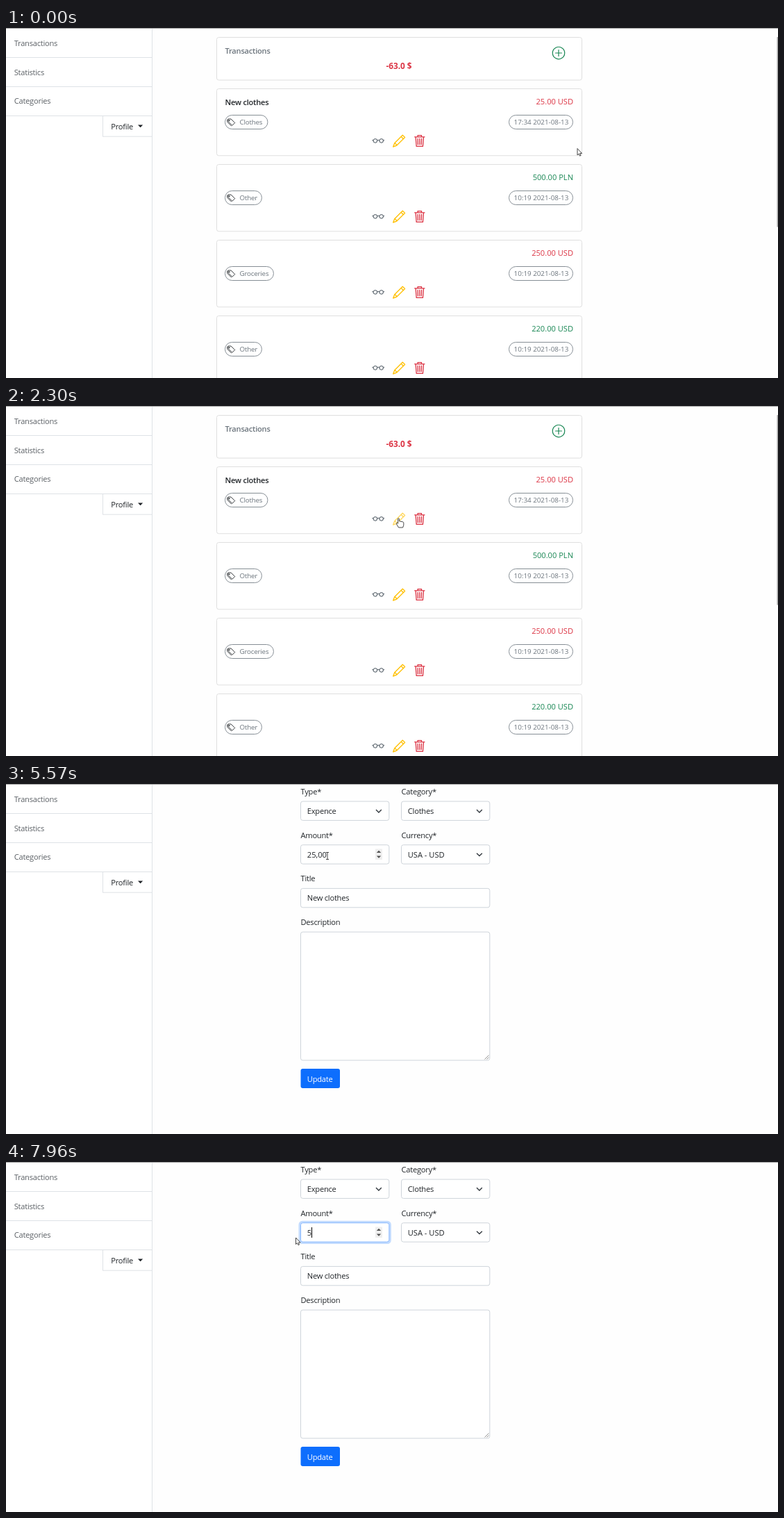
Recreate the animation shown at these times as an HTML page. Size 1112 by 504 pixels, loop 8000 ms.

```html
<!DOCTYPE html>
<html lang="en">
<head>
<meta charset="utf-8">
<title>Transactions</title>
<style>
html, body { margin: 0; width: 100%; height: 100%; overflow: hidden; background: #fefefe; }
svg { display: block; width: 100vw; height: 100vh; }
text { font: 11.1px "Open Sans", "Noto Sans", sans-serif; letter-spacing: -.02em; fill: #212529; white-space: pre; }
.gray { fill: #6c757d; }
.nav { fill: #5c6166; }
.red { fill: #dc3545; }
.green { fill: #198754; }
.white { fill: #fff; }
.semi { font-weight: 600; }
.num { letter-spacing: 0; }
.small { font-size: 9.8px; }
.end { text-anchor: end; }
.total { font-size: 11.8px; font-weight: 700; text-anchor: middle; letter-spacing: 0; }
.icon { fill: none; stroke-width: 1.2; stroke-linecap: round; stroke-linejoin: round; }
</style>
</head>
<body>
<svg id="stage" viewBox="0 0 1112 504"></svg>
<script>
const LOOP = 8000;
const FRAME = 54;
const BORDER = '#ced4da', CARD = '#dfdfdf', LINE = '#dee2e6', PILL = '#868e95';
const $ = id => document.getElementById(id);

const text = (x, y, s, cls = '') => `<text x="${x}" y="${y}" class="${cls}">${s}</text>`;
const rect = (x, y, w, h, r, stroke, fill = '#fff', extra = '') =>
  `<rect x="${x}" y="${y}" width="${w}" height="${h}" rx="${r}" stroke="${stroke}" fill="${fill}" ${extra}/>`;
const line = (d, stroke, w = 1) => `<path d="${d}" fill="none" stroke="${stroke}" stroke-width="${w}"/>`;
const icon = (id, x, y, scale, color, d) =>
  `<path id="${id}" class="icon" transform="translate(${x} ${y}) scale(${scale})" stroke="${color}" d="${d}"/>`;

const TAG = 'M2.5 1.5h5l7.4 7.4-5 5-7.4-7.2zM.5 2.8v4.5l7.5 7.5M4 4h1v1h-1z';
const GLASSES = 'M1.5 8a2.5 2.5 0 1 1 0 .1M9.5 8a2.5 2.5 0 1 1 0 .1M6.5 7.6q1.5-1 3 0M.4 7.4h1M14.5 7.4h1';
const PENCIL = 'M12.5.6l2.9 2.9L5.2 13.6.6 15.4l1.8-4.6zM10.6 2.5l2.9 2.9M2.6 10.6l2.8 2.8';
const TRASH = 'M1.5 3h13M5.5 3v-2h5v2M2.8 3l1 12.3h8.4l1-12.3M5.5 5.4l.3 7.6M8 5.4v7.6M10.5 5.4l-.3 7.6';

// Sidebar
const navItem = (label, i) => {
  const y = 41.8 * i;
  return text(11.7, y + 25.8, label, 'nav') + line(`M0 ${Math.round(y + 42) + .5}h210`, LINE);
};
const sidebar = rect(-1, -1, 211.5, 506, 0, LINE) +
  ['Transactions', 'Statistics', 'Categories'].map(navItem).join('') +
  rect(139.5, 126.5, 71, 29.7, 0, LINE) +
  text(151.3, 146, 'Profile') +
  '<path d="M190 139.5h7.2l-3.6 3.8z" fill="#212529"/>' +
  line('M0 .5h1112', '#a3a3a3');

// Transaction list
const pill = (x, y, w) => rect(x, y, w, 20, 10, PILL);
const card = ([title, amount, color, tag, time], i) => {
  const y = 87.5 + 109 * i;
  return rect(303.5, y, 526, 96.3, 3, CARD) +
    text(315.5, y + 23.2, title, 'semi') +
    text(817, y + 22, amount, `num end ${color}`) +
    pill(315.5, y + 38, 31.7 + 4.25 * tag.length) +
    icon(`tag${i}`, 318.5, y + 42.4, .75, '#212529', TAG) +
    text(336.5, y + 51.8, tag, 'gray small') +
    pill(724.5, y + 38, 92) +
    text(810.3, y + 51.8, `${time} 2021-08-13`, 'gray small num end') +
    icon(`glasses${i}`, 527.5, y + 66, 1.1, '#6c757d', GLASSES) +
    icon(`pencil${i}`, 557, y + 66, 1.14, '#ffc107', PENCIL) +
    icon(`trash${i}`, 587, y + 66, 1.1, '#dc3545', TRASH);
};
const list = rect(303.5, 13.5, 526, 61.5, 3, CARD) +
  text(315.5, 37, 'Transactions', 'gray semi') +
  text(566, 58.5, '-63.0 $', 'red total') +
  icon('add', 796, 36, 1, '#198754', 'M-8.7 0a8.7 8.7 0 1 1 0 .1M-4.5 0h9M0-4.5v9') +
  [
    ['New clothes', '25.00 USD', 'red', 'Clothes', '17:34'],
    ['', '500.00 PLN', 'green', 'Other', '10:19'],
    ['', '250.00 USD', 'red', 'Groceries', '10:19'],
    ['', '220.00 USD', 'green', 'Other', '10:19']
  ].map(card).join('') +
  rect(1110.5, 13, 1.5, 273.5, 0, 'none', '#a8a8a8');

// Edit form: two columns, equally spaced rows
const colX = col => 424.5 + 145 * col;
const rowY = row => 25 + 62.7 * row;
const field = (col, row, label, value = '', w = 127.3, h = 27.4, id = '') =>
  text(colX(col), rowY(row) - 10.2, label) +
  rect(colX(col), rowY(row), w, h, 3, BORDER, '#fff', id && `id="${id}"`) +
  text(colX(col) + 9.3, rowY(row) + 18, value, row === 1 ? 'num' : '');
const select = (col, row, label, value) => field(col, row, label, value) +
  line(`M${colX(col) + 108.5} ${rowY(row) + 12}l3.9 3.9 3.9-3.9`, '#343a40', 1.4);

const FULL = 272.3;
const amountY = rowY(1);
const form = rect(423, amountY - 1.5, 130.3, 30.4, 4, '#c2dbfe', 'none', 'id="ring" stroke-width="3"') +
  select(0, 0, 'Type*', 'Expence') +
  select(1, 0, 'Category*', 'Clothes') +
  field(0, 1, 'Amount*', '<tspan id="amount">25,00</tspan>', 127.3, 27.4, 'amountBox') +
  select(1, 1, 'Currency*', 'USA - USD') +
  field(0, 2, 'Title', 'New clothes', FULL) +
  field(0, 3, 'Description', '', FULL, 184.8) +
  `<clipPath id="clip">${rect(0, 94, 0, 15, 0, 'none', '#000', 'id="clipBox"')}</clipPath>` +
  `<g id="picked" clip-path="url(#clip)">${rect(433.5, 94, 28.7, 15, 0, 'none', '#2f8cf3')}` +
  text(433.8, amountY + 18, '25,00', 'num white') + '</g>' +
  `<g id="caret">${line('M440.5 94v15', '#000')}</g>` +
  `<g id="spinner">${rect(532, 93.5, 10, 15.5, 0, 'none', '#efefef')}` +
  '<path d="M533.8 99h6.4l-3.2-3.2zM533.8 103.6h6.4l-3.2 3.2z" fill="#505050"/></g>' +
  line('M689.5 396.5l6-6M692.5 396.5l3-3', '#777', .8) +
  rect(424.5, 410, 56.5, 28, 3, 'none', '#0d6efd') +
  text(433.8, 428.6, 'Update', 'white');

const cursor = '<g id="cursor" stroke="#333" stroke-width=".9" stroke-linejoin="round">' +
  '<path id="arrow" fill="#fff" d="M.5.5v9.5l2.1-1.9 1.4 3.1 1.5-.7-1.3-3h2.9z"/>' +
  '<path id="hand" fill="#fff" d="M-.9 1.2q.9-1.2 1.8 0v3.6l5 1q1.4.3 1.4 1.6v3l-1.2 3.6H0l-3-5q-.3-1.8 1-1.8l1.1 1z"/>' +
  '<path id="beam" fill="none" d="M-2-5h4M0-5v10M-2 5h4"/></g>';

$('stage').innerHTML = sidebar + `<g id="list">${list}</g><g id="form">${form}</g>` + cursor;

// Mouse strokes; sway makes a stroke draw back first and overshoot
const strokes = [
  { from: 370, to: 880, x: 591, y: 154 },
  { from: 1060, to: 1280, x: 548, y: 124 },
  { from: 1660, to: 1950, x: 565.5, y: 159 },
  { from: 2300, to: 2300, x: 565.5, y: 161 },
  { from: 3630, to: 3630, x: 561, y: 179 },
  { from: 3810, to: 4590, x: 523, y: 110, sway: .35 },
  { from: 4980, to: 5330, x: 463, y: 103.5 },
  { from: 5810, to: 5920, x: 451, y: 96 },
  { from: 5970, to: 6050, x: 479, y: 94 },
  { from: 6100, to: 6180, x: 462, y: 102 },
  { from: 6360, to: 6800, x: 378, y: 102 },
  { from: 6855, to: 7130, x: 400, y: 108.5 },
  { from: 7880, to: 7960, x: 417, y: 108.5 }
];

function progress({ from, to, sway = 0 }, t) {
  const steps = Math.round((to - from) / FRAME) + 1;
  const gap = (to - from) / (steps - 1) || 1;
  const p = Math.min(1, (Math.floor((t - from) / gap + .001) + 1) / steps);
  return p - sway * Math.sin(2 * Math.PI * p);
}

function pointer(t) {
  let pos = { x: 822.5, y: 173 };
  for (const stroke of strokes) {
    if (t < stroke.from) break;
    const s = progress(stroke, t);
    pos = { x: pos.x + (stroke.x - pos.x) * s, y: pos.y + (stroke.y - pos.y) * s };
  }
  return pos;
}

const over = (p, x, y, w, h) => p.x >= x && p.x <= x + w && p.y >= y && p.y <= y + h;
const show = (id, on) => $(id).setAttribute('visibility', on ? 'visible' : 'hidden');

function draw(t) {
  const p = pointer(t);
  const editing = t >= 3570;
  const focused = t >= 6360;
  const dragging = focused && t < 6855;
  const typed = t >= 7920;

  const onPencil = !editing && over(p, 555, 149, 22, 27);
  const onTrash = !editing && over(p, 585, 149, 23, 27);
  const onAmount = editing && over(p, colX(0), amountY, 127, 27);
  const onTitle = editing && over(p, colX(0), rowY(2), FULL, 27);
  const opening = editing && t < 3630;
  const shape = onPencil || onTrash || opening ? 'hand'
    : onAmount || onTitle || dragging ? 'beam' : 'arrow';

  $('list').setAttribute('display', editing ? 'none' : 'inline');
  $('form').setAttribute('display', editing ? 'inline' : 'none');
  $('pencil0').setAttribute('opacity', onPencil ? .65 : 1);
  $('trash0').setAttribute('opacity', onTrash ? .65 : 1);

  for (const id of ['arrow', 'hand', 'beam']) show(id, id === shape);
  $('cursor').setAttribute('transform', `translate(${p.x} ${p.y})`);

  show('spinner', onAmount || focused);
  show('ring', focused);
  show('picked', t >= 6500 && !typed);
  show('caret', typed);
  $('amountBox').setAttribute('stroke', focused ? '#86b7fe' : BORDER);
  $('amount').textContent = typed ? '5' : '25,00';
  const pickX = t < 6600 ? 455.3 : 433.5;
  $('clipBox').setAttribute('x', pickX);
  $('clipBox').setAttribute('width', 462.2 - pickX);
}

const begin = performance.now();
function tick() {
  draw((performance.now() - begin) % LOOP);
  requestAnimationFrame(tick);
}
tick();
</script>
</body>
</html>
```
